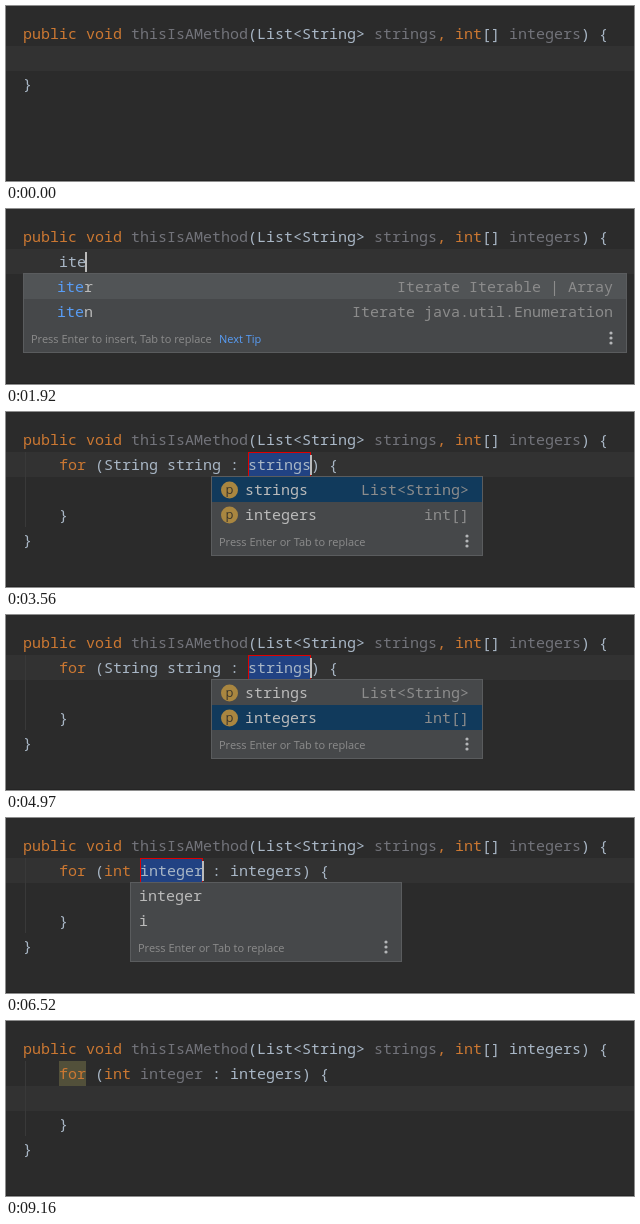
Write an HTML page with a canvas that moves like this. It is 628 px wide and 175 px high and loops after 9.62 s.

```html
<!DOCTYPE html>
<html lang="en">
<head>
<meta charset="utf-8">
<title>Loop template completion</title>
<style>
html, body { margin: 0; width: 100%; height: 100%; overflow: hidden; background: #2b2b2b; }
canvas { display: block; }
</style>
</head>
<body>
<canvas id="stage" width="628" height="175"></canvas>
<script>
const ctx = document.getElementById('stage').getContext('2d');
const LOOP = 9620, CELL = 9, ROW = 25, LEFT = 17, TOP = 15;
const MONO = '15px "Noto Sans Mono", "DejaVu Sans Mono", monospace';
const UI = '11px "Open Sans", "Noto Sans", sans-serif';
const C = {
  back: '#2b2b2b', line: '#323232', text: '#a9b7c6', keyword: '#cc7832', unused: '#72737a',
  popup: '#46484a', border: '#5a5c5e', idle: '#515456', active: '#113a5c',
  item: '#bbbbbb', match: '#589df6', hint: '#8c8c8c'
};

function box(x, y, w, h, color) {
  ctx.fillStyle = color;
  ctx.fillRect(x, y, w, h);
}

function write(text, x, y, color, font = MONO, align = 'left') {
  ctx.font = font;
  ctx.textAlign = align;
  ctx.fillStyle = color;
  ctx.fillText(text, x, y);
}

// Draws [text, color] parts from a text column on an editor row.
function code(row, col, ...parts) {
  for (const [text, color = C.text] of parts) {
    write(text, LEFT + col * CELL, TOP + row * ROW + 18, color);
    col += text.length;
  }
}

function caret(row, col) {
  box(LEFT + col * CELL - 1, TOP + row * ROW + 3, 2, 20, '#bbbbbb');
}

// True while t is inside one of the [from, to] spans.
const during = (t, ...spans) => spans.some(([from, to]) => t >= from && t < to);

function icon(x, y, letter, color) {
  ctx.fillStyle = color;
  ctx.beginPath();
  ctx.arc(x, y, 8.5, 0, Math.PI * 2);
  ctx.fill();
  write(letter, x, y + 4, '#3a352b', '13px "Open Sans", sans-serif', 'center');
}

function spinner(x, y) {
  ctx.lineWidth = 1.5;
  for (let i = 0; i < 8; i++) {
    const a = i * Math.PI / 4;
    ctx.strokeStyle = `rgba(175,177,179,${0.25 + i * 0.09})`;
    ctx.beginPath();
    ctx.moveTo(x + 3 * Math.cos(a), y + 3 * Math.sin(a));
    ctx.lineTo(x + 6.5 * Math.cos(a), y + 6.5 * Math.sin(a));
    ctx.stroke();
  }
}

function popupItem(item, x, right, y) {
  const { name, type = '', from = 0, hit = 0, kind, bold } = item;
  const font = bold ? 'bold ' + MONO : MONO;
  if (kind) icon(x - 15.5, y + 13, kind, kind === 'p' ? '#a98640' : '#b4616e');
  [...name].forEach((ch, i) => {
    const color = i >= from && i < from + hit ? C.match : C.item;
    write(ch, x + i * CELL, y + 18, color, font);
  });
  write(type, right - 14 - type.length * CELL, y + 18, C.hint);
}

function popup({ x, right, textX, items, selected = -1, color = C.idle, tip, next, long }) {
  const y = 64, bottom = long ? 200 : y + items.length * ROW + 30;
  box(x, y, right - x, bottom - y, C.border);
  box(x + 1, y + 1, right - x - 2, bottom - y - 2, C.popup);
  if (selected >= 0) box(x + 1, y + 1 + selected * ROW, right - x - 2, ROW, color);
  items.forEach((item, i) => popupItem(item, textX, right, y + 1 + i * ROW));
  if (long) {
    box(right - 13, y + 2, 11, 120, '#7b7d7e');
    return;
  }
  const base = bottom - 10;
  write(tip, x + 8, base, C.hint, UI);
  if (next) write('Next Tip', 213, base, C.match, UI);
  for (let i = -1; i <= 1; i++) {
    ctx.fillStyle = '#b4b6b8';
    ctx.beginPath();
    ctx.arc(right - 16, base - 5 + i * 5, 1.6, 0, Math.PI * 2);
    ctx.fill();
  }
}

const wide = { x: 17, right: 621, textX: 51, selected: 0 };
const ITER = 'Iterate Iterable | Array', ITEN = 'Iterate java.util.Enumeration';
const insertTip = 'Press Enter to insert, Tab to replace';
const replaceTip = 'Press Enter or Tab to replace';

const letterItems = [
  { name: 'integers', type: 'int[]', hit: 1, kind: 'p' },
  { name: 'int', hit: 1, bold: true },
  { name: 'if', hit: 1, bold: true },
  { name: 'strings', type: 'List<String>', from: 3, hit: 1, kind: 'p' },
  { name: 'toString()', type: 'String', from: 5, hit: 1, kind: 'm' }
];
const pairItems = [
  { name: 'iter', type: ITER, hit: 2 },
  { name: 'itar', type: 'Iterate elements of array', hit: 2 },
  { name: 'itco', type: 'Iterate elements of java.util.Collection', hit: 2 },
  { name: 'iten', type: ITEN, hit: 2 },
  { name: 'itit', type: 'Iterate java.util.Iterator', hit: 2 }
];
const variableItems = [
  { name: 'strings', type: 'List<String>', kind: 'p' },
  { name: 'integers', type: 'int[]', kind: 'p' }
];

function signature(used) {
  code(0, 0, ['public void ', C.keyword], ['thisIsAMethod', C.unused], ['(List<String> '],
    ['strings', C.unused], [',', C.keyword], [' '], ['int', C.keyword], ['[] '],
    ['integers', used ? C.text : C.unused], [') {']);
}

function typing(t) {
  const length = t < 930 ? 0 : t < 1460 ? 1 : t < 1700 ? 2 : t < 2320 ? 3 : 4;
  code(1, 4, ['iter'.slice(0, length)]);
  code(2, 0, ['}']);
  if (during(t, [150, 680], [930, 3180])) caret(1, 4 + length);

  if (during(t, [1160, 1540])) {
    popup({ ...wide, items: letterItems, long: true });
  } else if (during(t, [1540, 1770])) {
    popup({ ...wide, items: pairItems, long: true });
  } else if (during(t, [1770, 2320])) {
    const items = [{ name: 'iter', type: ITER, hit: 3 }, { name: 'iten', type: ITEN, hit: 3 }];
    popup({ ...wide, items, tip: insertTip, next: true });
    if (t < 1920) spinner(580, 129);
  } else if (during(t, [2320, 3410])) {
    popup({ ...wide, items: [{ name: 'iter', type: ITER, hit: 4 }], tip: insertTip, next: true });
    if (t < 2890) spinner(575, 104);
  }
}

function selection(col, length) {
  const x = LEFT + col * CELL, w = length * CELL;
  box(x, 40, w, ROW, '#214283');
  ctx.strokeStyle = '#e00000';
  ctx.lineWidth = 1;
  ctx.strokeRect(x + 0.5, 40.5, w - 1, ROW - 1);
}

function template(t) {
  const picked = t >= 6440, done = t >= 7990, checked = t >= 8310;
  box(19, 40, 1, 75, '#393939');
  if (checked) box(53, 40, 27, ROW, '#52503a');
  if (!picked) selection(25, 7);
  else if (!done) selection(13, 7);

  code(1, 4, ['for', C.keyword], [' (']);
  if (picked) {
    code(1, 9, ['int ', C.keyword], ['integer', checked ? C.unused : C.text], [' : integers) {']);
  } else {
    code(1, 9, ['String string : strings) {']);
  }
  code(3, 4, ['}']);
  code(4, 0, ['}']);

  if (during(t, [3560, 4180], [4650, 5200], [5680, 6140])) caret(1, 32);
  if (during(t, [6440, 7150], [7680, 7990])) caret(1, 20);
  if (during(t, [7990, 9160])) caret(2, 8);

  if (!picked) {
    popup({ x: 205, right: 477, textX: 239, items: variableItems,
      selected: t < 4970 ? 0 : 1, color: C.active, tip: replaceTip });
  } else if (during(t, [6520, 7910])) {
    popup({ x: 124, right: 396, textX: 133, items: [{ name: 'integer' }, { name: 'i' }], tip: replaceTip });
  }
}

function draw(t) {
  box(0, 0, 628, 175, C.back);
  box(0, 174, 628, 1, '#242424');
  box(0, t < 7990 ? 40 : 65, 628, ROW, C.line);
  signature(t >= 8310);
  if (t < 3560) typing(t);
  else template(t);
}

const start = performance.now();
function tick() {
  draw((performance.now() - start) % LOOP);
  requestAnimationFrame(tick);
}
tick();
</script>
</body>
</html>
```
